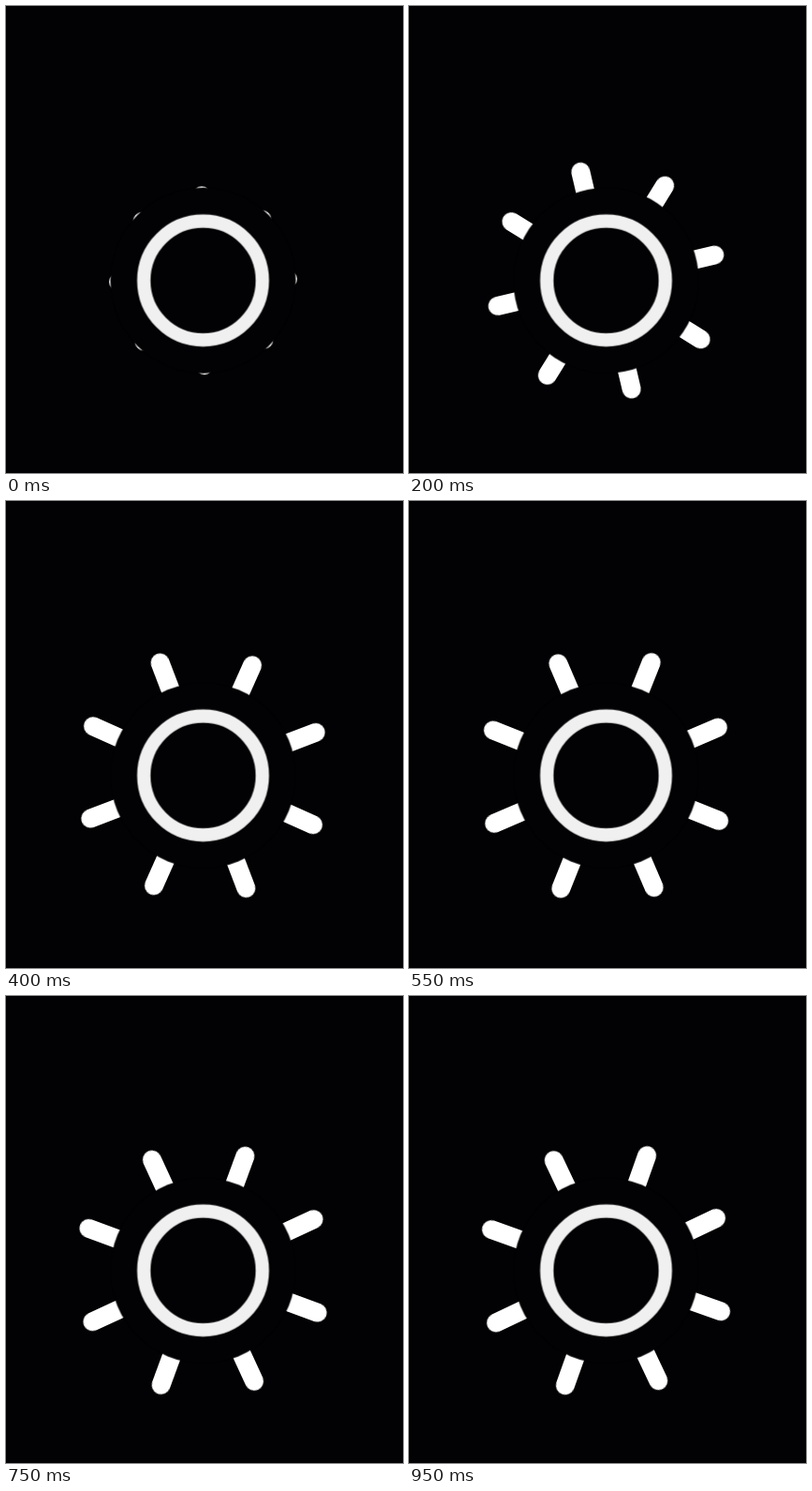
An HTML page without scripts for the animation above (1000 ms loop, 424x498 px).

```html
<!DOCTYPE html>
<html lang="en">
<head>
<meta charset="utf-8">
<title>Sun</title>
<style>
  :root { --night: #020103; }
  html, body { margin: 0; width: 100%; height: 100%; overflow: hidden; background: var(--night); }
  svg { display: block; width: 424px; height: 498px; }

  .ring { fill: none; stroke: #f0f0f0; stroke-width: 14.3; }
  .cover { fill: var(--night); }
  .rays { animation: turn 1s infinite; }
  .rays path {
    stroke: #fff; stroke-width: 20; stroke-linecap: round;
    animation: grow 1s infinite;
  }

  /* Held poses at 20 per second; steps(n) fills n poses between keys */
  @keyframes turn {
    0%   { transform: rotate(-.9deg);   animation-timing-function: steps(1); }
    5%   { transform: rotate(-3.2deg);  animation-timing-function: steps(1); }
    10%  { transform: rotate(-6.4deg);  animation-timing-function: steps(2); }
    20%  { transform: rotate(-13.2deg); animation-timing-function: steps(1); }
    25%  { transform: rotate(-16.2deg); animation-timing-function: steps(1); }
    30%  { transform: rotate(-18.4deg); animation-timing-function: steps(1); }
    35%  { transform: rotate(-19.8deg); animation-timing-function: steps(1); }
    40%  { transform: rotate(-20.9deg); animation-timing-function: steps(1); }
    45%  { transform: rotate(-21.8deg); animation-timing-function: steps(2); }
    55%  { transform: rotate(-23.2deg); animation-timing-function: steps(2); }
    65%  { transform: rotate(-24.1deg); animation-timing-function: steps(2); }
    75%  { transform: rotate(-24.8deg); animation-timing-function: steps(2); }
    85%  { transform: rotate(-25.2deg); animation-timing-function: steps(2); }
    95%, 100% { transform: rotate(-25.4deg); }
  }
  @keyframes grow {
    0%   { transform: rotate(var(--a)) translateY(-90.4px);  animation-timing-function: steps(1); }
    5%   { transform: rotate(var(--a)) translateY(-98px);    animation-timing-function: steps(1); }
    10%  { transform: rotate(var(--a)) translateY(-106px);   animation-timing-function: steps(1); }
    15%  { transform: rotate(var(--a)) translateY(-113.2px); animation-timing-function: steps(1); }
    20%  { transform: rotate(var(--a)) translateY(-119px);   animation-timing-function: steps(1); }
    25%  { transform: rotate(var(--a)) translateY(-123.1px); animation-timing-function: steps(1); }
    30%  { transform: rotate(var(--a)) translateY(-126px);   animation-timing-function: steps(2); }
    40%  { transform: rotate(var(--a)) translateY(-128.7px); animation-timing-function: steps(3); }
    55%  { transform: rotate(var(--a)) translateY(-129.9px); animation-timing-function: steps(4); }
    75%, 100% { transform: rotate(var(--a)) translateY(-130.1px); }
  }
</style>
</head>
<body>
<svg viewBox="0 0 424 498">
  <g transform="translate(210.5 292.7)">
    <g class="rays">
      <path d="M0 0v40" style="--a: 0deg"/>
      <path d="M0 0v40" style="--a: 45deg"/>
      <path d="M0 0v40" style="--a: 90deg"/>
      <path d="M0 0v40" style="--a: 135deg"/>
      <path d="M0 0v40" style="--a: 180deg"/>
      <path d="M0 0v40" style="--a: 225deg"/>
      <path d="M0 0v40" style="--a: 270deg"/>
      <path d="M0 0v40" style="--a: 315deg"/>
    </g>
    <circle class="cover" r="99"/>
    <circle class="ring" r="63.3"/>
  </g>
</svg>
</body>
</html>
```
